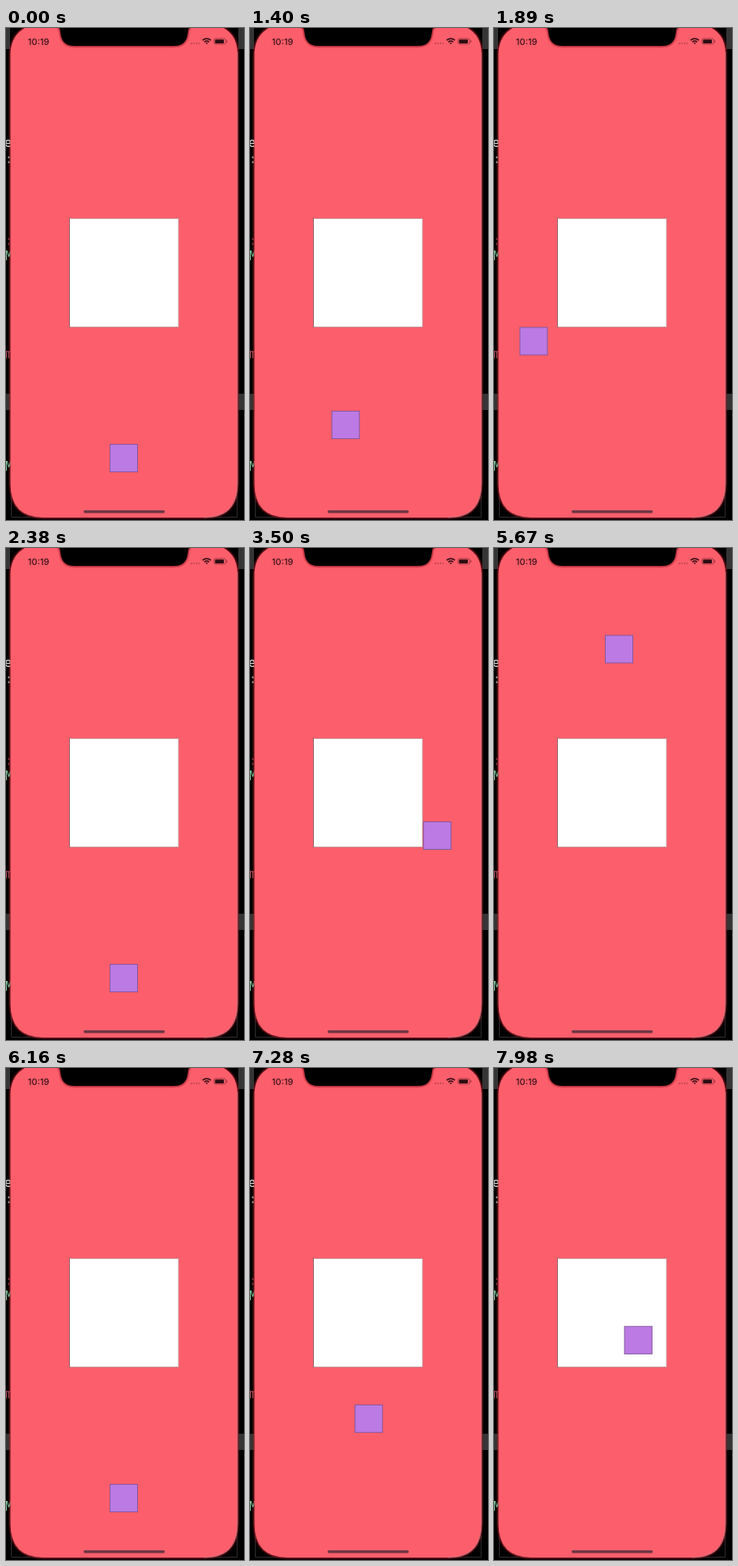
An HTML page that plays this animation: 294 by 608 pixels, repeating every 8 s.

```html
<!DOCTYPE html>
<html lang="en">
<head>
<meta charset="utf-8">
<title>Drag and drop</title>
<style>
  html, body { margin: 0; width: 100%; height: 100%; overflow: hidden; background: #000; }
  svg { display: block; width: 294px; height: 608px; }
  .code { font: 15px "DejaVu Sans Mono", monospace; text-anchor: end; }
  .clock { font: 500 11px Inter, "Liberation Sans", sans-serif; fill: #3a1219; }
</style>
</head>
<body>
<svg viewBox="0 0 294 608">
  <defs>
    <filter id="soft"><feGaussianBlur stdDeviation=".8"/></filter>
    <clipPath id="margin"><rect width="5.5" height="608"/></clipPath>
    <path id="screen" d="M5.5 30Q7 8 25 -1H267Q285 8 286 30V563Q286 605 245 605H46.5Q5.5 605 5.5 563Z"/>
    <path id="notch" d="M64 -1Q67.5 0 67.5 6Q69 22 84 22H208Q223 22 224.5 6Q224.5 0 228 -1Z"/>
  </defs>

  <rect width="294" height="608"/>
  <g fill="#353535">
    <rect width="294" height="26"/>
    <rect y="452" width="294" height="20"/>
  </g>
  <path d="M5 0H287V570Q285 606 250 606H42Q7 606 5 570Z"/>
  <path d="M6.5 575V604.5H285.5V575" fill="none" stroke="#484044" stroke-width=".7"/>
  <use href="#screen" fill="none" stroke="#8f1a26" stroke-width="2.4" filter="url(#soft)"/>
  <g class="code" clip-path="url(#margin)">
    <text x="7" y="147" fill="#ddd">ke</text>
    <text x="8" y="167" fill="#999">n:</text>
    <text x="8" y="268" fill="#8c2f3c">:</text>
    <text x="8" y="287" fill="#7fc79b">uM</text>
    <text x="8" y="408" fill="#b54855">.m</text>
    <text x="8" y="547" fill="#7fc79b">uM</text>
  </g>
  <use href="#screen" fill="#fd5e6b"/>
  <path d="M286 30V563Q286 605 245 605" fill="none" stroke="#a78086" stroke-width=".7"/>
  <use href="#notch" stroke="#8f1a26" stroke-width="2.4" filter="url(#soft)"/>
  <use href="#notch"/>

  <!-- Status bar -->
  <text class="clock" x="27" y="20.8">10:19</text>
  <path d="M228.4 19H239" stroke="#a53c48" stroke-width="1.5" stroke-dasharray="1.5 1.6"/>
  <g fill="none" stroke="#3a1219" stroke-width="1.6">
    <path d="M242.8 15.2Q248 11 253.2 15.2M244.9 17.3Q248 14.8 251.1 17.3"/>
    <path d="M246.6 18.6L248 20.2L249.4 18.6Q248 17.5 246.6 18.6Z" fill="#3a1219" stroke="none"/>
    <rect x="257" y="13" width="14.5" height="7" rx="2" stroke="#91303c" stroke-width=".8"/>
    <path d="M273 15.3V17.8" stroke="#91303c" stroke-width="1"/>
  </g>
  <rect x="258.2" y="14.2" width="11" height="4.7" rx="1" fill="#2c0c12"/>

  <rect x="95.8" y="596" width="100.4" height="3.6" rx="1.8" fill="#713644"/>
  <rect x="78.5" y="235.4" width="134.6" height="134.2" fill="#fff" stroke="#c08f96" stroke-width=".9"/>
  <path d="M78.5 235V370" stroke="#8a6f74"/>
  <rect id="box" width="34" height="34" fill="#bc7ae4" stroke="#84589f"/>
</svg>
<script>
const LOOP = 8000, STEP = 70, SETTLE = 460;
const box = document.getElementById('box');
const home = { x: 128.5, y: 514.5 };

// Drags dropped outside the square; bend bows the path to the right.
const misses = [
  { start: 1290, end: 1890, x: 32, y: 370, bend: 0 },
  { start: 3040, end: 3900, x: 234, y: 278, bend: 10 },
  { start: 5070, end: 5670, x: 137.5, y: 108, bend: 50 }
];
// The last drag rises into the square and circles there.
const hit = { start: 6900, enter: 7420, end: 7980, x: 130.8, y: 284.5, r: 46.2, sweep: 7 };

const mix = (a, b, k) => a + (b - a) * k;
const toward = (p, k) => ({ x: mix(home.x, p.x, k), y: mix(home.y, p.y, k) });

function spring(ms) {
  const s = ms / 1000, decay = 11, freq = 10.5;
  return Math.exp(-decay * s) * (Math.cos(freq * s) + decay / freq * Math.sin(freq * s));
}

function missed(drag, t) {
  if (t > drag.end) return toward(drag, spring(t - drag.end));
  const k = Math.sin((t - drag.start) / (drag.end - drag.start) * Math.PI / 2);
  const p = toward(drag, k);
  p.x += drag.bend * Math.sin(Math.PI * k);
  return p;
}

function circled(t) {
  const { start, enter, end, x, y, r, sweep } = hit;
  if (t < enter) return toward({ x, y: y + r }, ((t - start) / (enter - start)) ** 2);
  const angle = Math.PI / 2 - sweep * (t - enter) / (end - enter);
  return { x: x + r * Math.cos(angle), y: y + r * Math.sin(angle) };
}

function position(t) {
  if (t >= hit.start) return circled(t);
  const drag = misses.find(d => t >= d.start && t < d.end + SETTLE);
  return drag ? missed(drag, t) : home;
}

function draw(ms) {
  const t = Math.floor((ms % LOOP) / STEP + 1e-6) * STEP;
  const { x, y } = position(t);
  box.setAttribute('x', x.toFixed(1));
  box.setAttribute('y', y.toFixed(1));
}

const begin = performance.now();
function tick() {
  draw(performance.now() - begin);
  requestAnimationFrame(tick);
}
tick();
</script>
</body>
</html>
```
